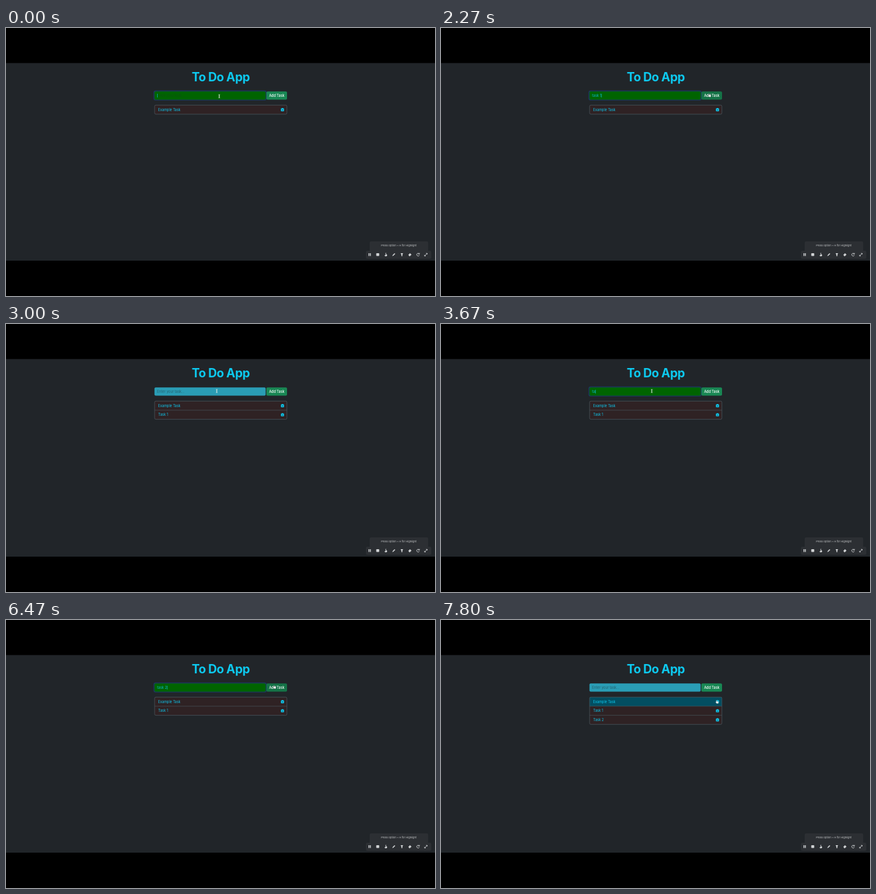
These frames come from a looping animation (690 px wide and 432 px high, 8000 ms). An HTML page:

```html
<!DOCTYPE html>
<html lang="en">
<head>
<meta charset="utf-8">
<title>To Do App</title>
<style>
html, body { margin: 0; width: 100%; height: 100%; overflow: hidden; background: #000; }
svg { display: block; width: 100vw; height: 100vh; }
text { font: 5.5px Inter, Roboto, sans-serif; fill: #0dcaf0; white-space: pre; }
#title { font-size: 19.4px; font-weight: 700; letter-spacing: -.45px; }
#add { font-weight: 500; fill: #fff; }
#hint { font-size: 4.05px; fill: #c4c6c8; }
#icons { fill: #d0d2d4; stroke: #d0d2d4; stroke-width: 0; }
#icons .line { fill: none; stroke-width: .9; }
</style>
</head>
<body>
<svg viewBox="0 0 690 432">
  <defs>
    <g id="bin">
      <path d="M-2.5-1.8h1.4v-.8h2.2v.8h1.4v3.6q0 .8-.8.8h-3.4q-.8 0-.8-.8z" fill="#0dcaf0"/>
      <path d="M-.9-.4L.9 1.4M.9-.4L-.9 1.4" stroke="#2f2224" stroke-width=".6"/>
    </g>
  </defs>
  <rect y="56.5" width="690" height="318.5" fill="#212529"/>
  <text id="title" x="345.3" y="86" text-anchor="middle">To Do App</text>

  <rect id="ring" x="237.3" y="100.8" width="181.8" height="16" rx="3" fill="#0d6efd" fill-opacity=".25"/>
  <rect id="field" x="238.8" y="102.3" width="178.8" height="13.2" rx="2"/>
  <text id="entry" x="243" y="111"></text>
  <rect id="caret" y="106" width=".6" height="6" fill="#0dcaf0"/>
  <rect id="button" x="418.8" y="102.3" width="33.2" height="13.2" rx="2"/>
  <text id="add" x="435.5" y="111" text-anchor="middle">Add Task</text>

  <g id="list"></g>

  <rect x="585" y="344" width="94" height="17" rx="2" fill="#2c2f33"/>
  <rect x="579" y="359" width="105" height="13" rx="2" fill="#2c2f33"/>
  <text id="hint" x="631.7" y="352.4" text-anchor="middle">Press Option + H for Highlight</text>
  <g id="icons">
    <path d="M583 363h1.4v4.6H583zM585.4 363h1.4v4.6h-1.4z"/>
    <rect x="595.5" y="363" width="4.8" height="4.6" rx=".8"/>
    <path d="M610.4 362.6h1v2.2l1.6.7v1.2l-1 1.2h-2.2l-1-1.4.8-.5.8.4z"/>
    <path d="M621.4 367.7l.5-1.8 3-3 1.2 1.2-3 3z"/>
    <path d="M634.7 363h4l-1.2 2.6v2.2h-1.6v-2.2z"/>
    <path d="M647.2 365.6l2.6-2.6 2.4 2.2-2.4 2.5h-1.4z"/>
    <path class="line" d="M664.6 364a2.2 2.2 0 1 0 .3 2.2M665 362.6v1.8h-1.8"/>
    <path class="line" d="M673.3 367.4l4-4M675.6 363.2h1.8v1.8M675 367.5h-1.8v-1.8"/>
  </g>

  <path id="beam" d="M-1.3-2.8q1.3 0 1.3.7v4.2q0 .7-1.3.7M1.3-2.8q-1.3 0-1.3.7v4.2q0 .7 1.3.7" fill="none" stroke="#e4ebe6" stroke-width=".7"/>
  <path id="hand" d="M-1.2-2.6q.6-.5 1 .1v1.4l1.9.4q.8.3.7 1.1l-.5 2.3h-2.5l-1.9-2.4q.1-.8 1.3-.3z" fill="#f4f6f6" stroke="#30383c" stroke-width=".35"/>
</svg>
<script>
const LOOP = 8000;
const $ = id => document.getElementById(id);

// [from ms, value] steps
const typed = [[0, ''], [70, 't'], [200, 'ta'], [330, 'tas'], [400, 'task'], [670, 'task '],
  [1930, 'task 1'], [2400, ''], [3530, 't'], [3670, 'ta'], [3870, 'tas'], [4070, 'task'],
  [4330, 'task '], [5330, 'task 2'], [6670, '']];
const focus = [[0, true], [2400, false], [3130, true], [6670, false]];
const caretOn = [[0, true], [4600, false], [5330, true]];
const rowCount = [[0, 1], [2400, 2], [6670, 3]];
const pointerOn = [[0, true], [4670, false], [5800, true]];

// [ms, x, y] pointer path
const path = [[0, 343, 110], [1600, 343, 110], [1670, 377, 103], [1870, 432, 108],
  [2500, 432, 109], [2600, 408, 113], [2870, 339, 108], [5800, 339, 108],
  [6070, 390, 101], [6270, 432, 108], [6740, 432, 108], [7130, 444, 132], [LOOP, 444, 132]];
const buttonHover = [[1830, 2560], [6210, 6850]];
const rowHover = [7070, LOOP];

const at = (steps, t) => steps.findLast(s => s[0] <= t)[1];
const clamp = v => Math.max(0, Math.min(1, v));
const fade = ([from, to], t) => clamp((t - from) / 150) - clamp((t - to) / 150);
const mix = (a, b, k) => `rgb(${a.map((v, i) => Math.round(v + (b[i] - v) * k))})`;
const show = (el, on) => el.setAttribute('visibility', on ? 'visible' : 'hidden');

function pointer(t) {
  const i = path.findIndex(p => p[0] > t);
  const [t0, x0, y0] = path[i - 1], [t1, x1, y1] = path[i];
  const k = (t - t0) / (t1 - t0);
  return [x0 + (x1 - x0) * k, y0 + (y1 - y0) * k];
}

const ROW = 14.65, TOP = 124.3;
$('list').innerHTML = ['Example Task', 'Task 1', 'Task 2'].map((name, i) => {
  const y = TOP + i * ROW;
  return `<g><rect class="row" x="239" y="${y}" width="212.8" height="${ROW}" fill="#2f2224"/>
    <text x="244.8" y="${y + 9.4}">${name}</text><use href="#bin" x="444.7" y="${y + 7.3}"/>
    ${i ? `<path d="M239 ${y}h212.8" stroke="#4c5e66" stroke-width=".6"/>` : ''}</g>`;
}).join('') + '<rect id="frame" x="239" width="212.8" rx="2" fill="none" stroke="#4c5e66" stroke-width=".7"/>';
$('frame').setAttribute('y', TOP);
const rows = [...$('list').querySelectorAll('g')];

function draw(now) {
  const t = now % LOOP;
  const text = at(typed, t), focused = at(focus, t), count = at(rowCount, t);

  show($('ring'), focused);
  $('field').setAttribute('fill', focused ? '#006400' : '#2a9db5');
  const entry = $('entry');
  entry.textContent = text || 'Enter your task...';
  entry.style.fill = text ? '#0db4d2' : focused ? '#0b5410' : '#23606e';
  show($('caret'), focused && at(caretOn, t));
  $('caret').setAttribute('x', 243.1 + (text ? entry.getComputedTextLength() : 0));

  const hover = Math.max(...buttonHover.map(span => fade(span, t)));
  $('button').setAttribute('fill', mix([25, 135, 84], [21, 115, 71], hover));

  rows.forEach((row, i) => show(row, i < count));
  $('frame').setAttribute('height', ROW * count);
  rows[0].firstChild.setAttribute('fill', mix([47, 34, 36], [3, 78, 97], fade(rowHover, t)));

  const [x, y] = pointer(t);
  const overField = x < 405 && y < 116;
  for (const id of ['beam', 'hand']) {
    $(id).setAttribute('transform', `translate(${x} ${y})`);
    show($(id), at(pointerOn, t) && overField === (id === 'beam'));
  }
}

const start = performance.now();
function tick() {
  draw(performance.now() - start);
  requestAnimationFrame(tick);
}
tick();
</script>
</body>
</html>
```
